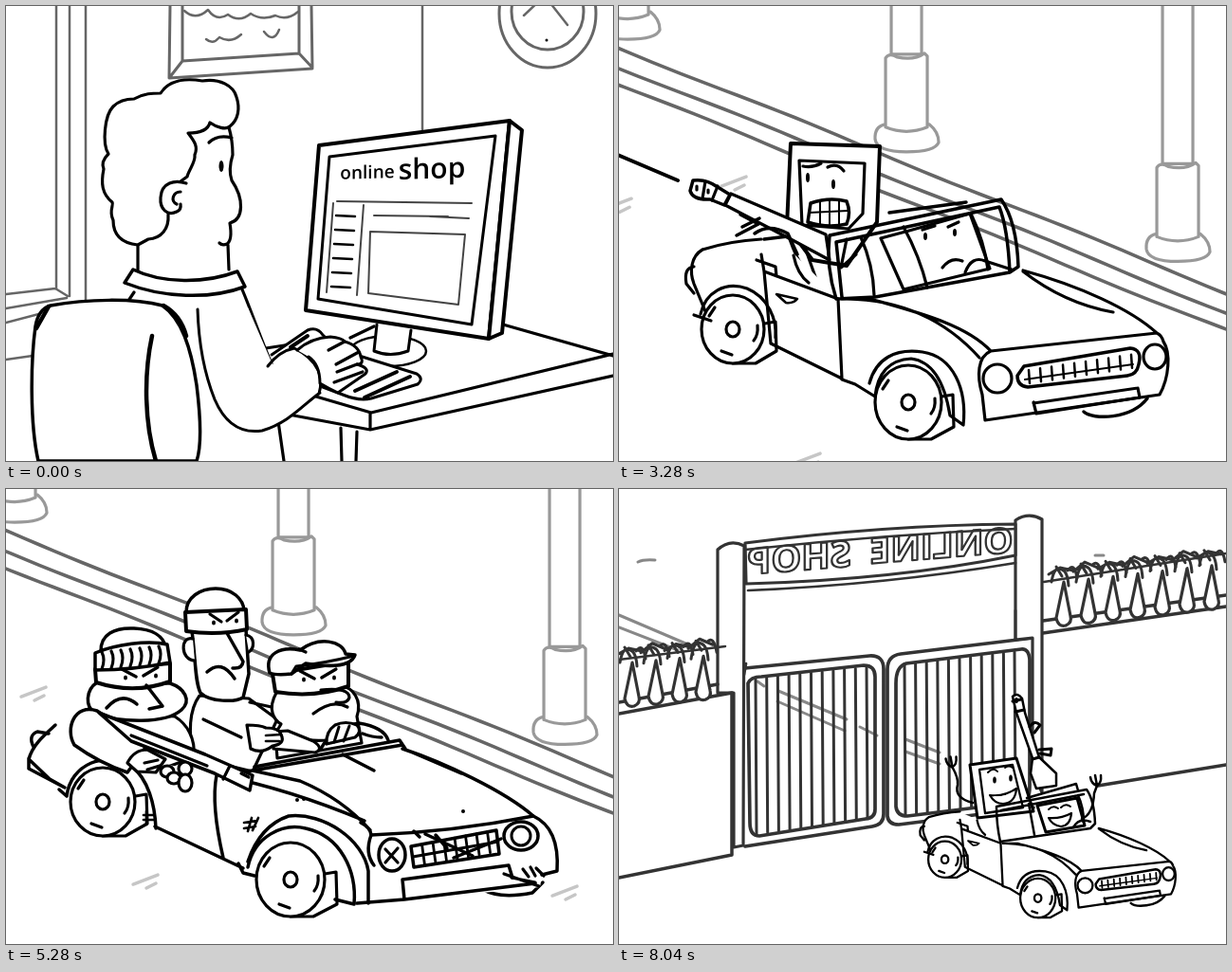
Animation of 640 by 480 pixels, one loop 8120 ms. Source, as an HTML page with a canvas:

```html
<!DOCTYPE html>
<html lang="en">
<head>
<meta charset="utf-8">
<title>Online shop chase</title>
<style>
html,body{margin:0;width:100%;height:100%;overflow:hidden;background:#fff}
canvas{display:block;width:100vw;height:100vh}
</style>
</head>
<body>
<canvas id="stage" width="640" height="480"></canvas>
<script>
const g = document.getElementById('stage').getContext('2d');
const LOOP = 8120, STEP = 40, SLOPE = .404;
const BLACK = '#000', DARK = '#333', GREY = '#666', PALE = '#999', FAINT = '#c6c6c6';
let weight = 1;

function ink(d, width = 3.2, color = BLACK, fill) {
  const p = new Path2D(d);
  if (fill) { g.fillStyle = fill; g.fill(p); }
  if (!width) return;
  g.lineWidth = width * weight; g.strokeStyle = color; g.stroke(p);
}
const solid = (d, width = 3.2, color = BLACK) => ink(d, width, color, '#fff');

function oval(x, y, rx, ry, width = 3.2, color = BLACK, fill = '#fff') {
  g.beginPath(); g.ellipse(x, y, rx, ry, 0, 0, 7);
  g.fillStyle = fill; g.fill();
  if (width) { g.lineWidth = width * weight; g.strokeStyle = color; g.stroke(); }
}
const dot = (x, y, rx = 2, ry = 4) => oval(x, y, rx, ry, 0, BLACK, BLACK);

function place(x, y, draw, s = 1) {
  g.save(); g.translate(x, y); g.scale(s, s); draw(); g.restore();
}
function label(text, x, y, size, matrix, color, bold = 600, outline) {
  g.save();
  g.transform(...matrix, x, y);
  g.font = `${bold} ${size}px "Open Sans", sans-serif`;
  g.textAlign = 'center'; g.textBaseline = 'middle';
  if (outline) { g.lineWidth = 2.3; g.strokeStyle = color; g.strokeText(text, 0, 0); }
  else { g.fillStyle = color; g.fillText(text, 0, 0); }
  g.restore();
}
const clamp = v => Math.max(0, Math.min(1, v));
const ease = v => (1 - Math.cos(Math.PI * clamp(v))) / 2;
const span = (t, a, b) => clamp((t - a) / (b - a));

// ---------- desk ----------
function room() {
  ink('M53 0V298M67 0V306M84 0V311M0 304L52 298L65 306M0 319L64 308M0 334L84 312M0 373L28 369', 2.5, GREY);
  ink('M439 0V130', 2.5, GREY);
  ink('M173 0L172 76L186 58V0M186 58L309 50V0M309 50L323 65L322 0M172 76L323 66', 3, GREY);
  ink('M188 5Q200 16 213 4Q222 17 234 9Q246 18 258 8Q270 16 284 10Q296 16 308 6M211 35Q218 41 224 34M225 33Q237 40 248 30M272 27Q282 40 288 25', 2.5, GREY);
  oval(571, 8, 51, 57, 3, GREY); oval(571, 6, 38, 40, 3, GREY);
  ink('M546 10L565 -8M574 -3L592 20', 2.5, GREY);
  dot(570, 36, 1.5, 1.5);
}
function desk() {
  ink('M274 361L300 357M363 350L388 338M524 336L640 369M303 405L385 429L640 367M298 431L384 447L640 390M384 429V447M353 445L354 480M370 449L369 480');
}
function monitor() {
  oval(403, 364, 40, 16, 2.5);
  solid('M391 336L388 364Q405 371 424 364L427 342', 3);
  solid('M330 147L531 121L509 351L316 321Z', 4);
  solid('M531 121L544 131L523 345L509 351Z', 4);
  solid('M341 159L516 137L491 336L329 309Z', 3);
  label('online', 381, 177, 19, [1, -.03, 0, 1], BLACK);
  label('shop', 449, 174, 30, [1, -.03, 0, 1], BLACK);
  ink('M349 206L491 208M345 208L338 302M377 210L370 305M388 221L466 222M447 222L488 224M384 238L484 241L477 315L382 303Z', 2, '#444');
  for (let i = 0; i < 6; i++) ink(`M${348 - i} ${221 + i * 15}l20 1`, 2.5);
}
function keyboard() {
  solid('M280 368L318 342Q328 338 334 347L350 362L433 388Q441 393 434 399L385 414Q372 417 355 410L334 402', 3);
  ink('M368 406L412 386M378 413L426 391M300 360L318 348', 4);
}
function man() {
  solid('M131 303L120 340L205 480H293L287 440L281 380C270 350 262 322 249 299Z', 0);
  ink('M135 302L127 314M249 299C260 325 268 350 281 380M287 438L293 480');
  solid('M139 252V281Q185 298 235 279L234 252Q238 240 236 229C249 229 252 208 238 184C235 172 239 150 235 128L190 120L150 160Z', 0);
  ink('M139 252V281M235 128C239 142 239 150 239 157C235 170 236 178 238 184C251 203 251 225 236 229Q239 247 233 251Q228 253 225 250M234 252L235 278M214 144C221 137 230 137 238 139');
  solid('M139 252C120 250 113 240 113 226C108 216 114 210 112 207C101 198 100 187 103 172C100 165 104 160 108 156C101 145 104 115 113 106C120 99 128 98 135 98C145 92 155 92 163 92C172 78 190 76 207 79C225 76 240 84 243 96C247 108 245 120 236 127C232 131 222 128 215 123C213 131 205 134 192 134C198 142 203 148 199 157C200 165 193 172 191 180L180 188L171 220C172 235 164 245 150 246Z');
  solid('M190 187C178 183 164 186 163 202C162 214 170 222 180 217Q185 215 184 209M184 196C176 196 173 206 180 209');
  dot(227, 169, 2.5, 6);
  solid('M134 278C165 293 210 293 244 280L252 296C215 310 165 308 125 292Z', 3.5);
}
function arm() {
  solid('M202 320C203 352 208 385 220 415C232 443 250 451 270 448C298 440 314 420 331 408Q333 390 325 380Q315 366 304 361L281 378L255 318', 0);
  ink('M202 320C203 352 208 385 220 415C232 443 250 451 270 448C298 440 314 420 331 408M276 380Q288 364 304 361Q322 370 329 384Q334 396 330 409', 3);
  solid('M307 363Q322 350 342 349Q354 350 357 354Q372 358 374 370Q378 378 370 378Q384 382 379 388L350 408Q341 404 331 398Q331 378 319 370', 3);
  ink('M357 354L340 363M372 365L348 378M370 378L349 386M346 397L376 386');
}
function chair() {
  solid('M34 480C25 440 26 375 31 338Q34 320 47 316C85 309 135 308 165 316C185 330 195 360 201 400C206 440 206 465 201 480Z', 3.5);
  ink('M154 348C145 390 146 440 158 480M166 316Q184 326 190 348M45 317L32 340', 4.5);
}
function deskScene(t) {
  const tap = t >= 160 && t < 520 ? Math.sin((t - 160) / 360 * Math.PI * 4) : 0;
  const jolt = Math.sin(span(t, 840, 1400) * Math.PI);
  room(); desk();
  place(jolt * 11, -jolt * 4, monitor);
  keyboard();
  place(-jolt * 5, -jolt * 10, () => { man(); place(tap * 4, -Math.abs(tap) * 5, arm); });
  chair();
}

// ---------- road ----------
const SPEED = 46.4, RAMP = 4.39, PAIR = 580;
function travelled(t) {
  const f = (t - 2400) / STEP;
  if (f <= 0) return 0;
  if (f < RAMP) return SPEED * f * f / (2 * RAMP);
  const sway = t > 3280 ? 7.5 * Math.sin(Math.PI * (t - 3280) / 2000) : 0;
  return SPEED * (f - RAMP / 2) - sway;
}
function post() {
  solid('M-16 -460V-90H16V-460', 3.2, PALE);
  solid('M-33 0Q-34 -14 -22 -16H24Q34 -8 34 3Q30 13 0 13Q-31 13 -33 0Z', 3.2, PALE);
  solid('M-22 -13V-86Q-18 -92 -10 -87Q8 -83 19 -91L22 -88V-13Q0 -4 -22 -13', 3.2, PALE);
}
function sign() {
  solid('M311 114V179Q320 191 332 180V120', 3.5, '#222');
  solid('M267 25L288 15L394 50L409 48L454 122L388 161L389 145L261 95Z', 3.5, '#222');
  ink('M267 25L391 70L392 57L440 130L454 122M392 57L409 48', 3.5, '#222');
  label('ONLINE', 334, 74, 27, [1, .36, 0, 1], '#222');
  label('SHOP', 337, 101, 27, [1, .29, 0, 1], '#222');
}
// Ground strokes: x, y and the distance at which they stand there.
const strokes = [[64,160,0],[226,315,0],[482,372,0],[0,380,0],[640,455,0],
  [122,186,919],[200,478,919],[26,140,1886],[488,450,1886],
  [30,215,3239],[148,413,3239],[590,425,3239],[300,330,620],[330,300,2740],[180,400,4040]];
const pebbles = [[474,181,0],[413,31,1886]];

function road(d) {
  const first = Math.floor((d - 348) / PAIR) - 1;
  for (let k = first; k < first + 4; k++)
    for (const gap of [0, 294]) {
      const dx = PAIR * k + gap - d;
      place(348 + dx, 159 + SLOPE * dx, post);
    }
  [44, 65, 83].forEach((y0, i) => {
    let path = '';
    for (let x = -10; x <= 650; x += 15)
      path += (path ? 'L' : 'M') + x + ' ' + (y0 + SLOPE * x + 1.2 * Math.sin((x + d) / 47 + i));
    ink(path, 3.6, GREY);
  });
  const along = ([x, y, at], draw) => place(x + at - d, y + (at - d) * SLOPE, draw);
  for (const s of strokes) along(s, () => ink('M-14 4L12 -6M0 8L10 3', 3.5, FAINT));
  for (const s of pebbles) along(s, () => ink('M-9 0Q0 -2 9 0', 3, '#888'));
  if (d < 700) place(-d, -d * SLOPE, sign);
}

// ---------- shop car ----------
function wheel(x, y, rx, ry) {
  const right = x + rx, low = y + ry;
  solid(`M${x} ${low}h24L${right + 13} ${low - 13}L${right + 12} ${y - 8}L${x} ${y}Z`);
  oval(x, y, rx, ry); oval(x, y, 7, 8);
  ink(`M${x - rx + 8} ${y - 14}l6 -9M${x - 12} ${low - 13}l11 4M${right - 7} ${y - 4}q1 10 -4 16`);
}
function shopCar() {
  ink('M490 428C500 437 540 436 557 414', 3.5);
  solid('M84 258L150 247L185 262L231 308L285 303L415 280C480 290 540 325 557 346L574 352C582 365 580 390 570 410L386 437L363 442L270 405L235 393L150 352L95 330L77 300C70 285 74 268 84 258Z', 0);
  wheel(120, 341, 33, 36); wheel(305, 418, 35, 39);
  ink('M88 257Q116 248 150 246M88 257C76 264 74 280 79 293L91 322M79 275Q68 276 71 293L79 303M150 262L153 280L231 309L235 393L160 356L153 280M145 268L165 275L166 285M184 263Q188 283 200 292');
  ink('M166 304L188 309Q184 314 176 313Z', 2.5);
  ink('M86 325C91 302 112 290 135 298C157 307 167 331 165 350M79 326L97 332');
  ink('M235 394L249 399L270 412Q274 374 308 372Q340 376 349 432L363 442C367 405 353 370 320 365C291 361 271 372 264 398');
  ink('M235 309L265 309C310 322 365 335 392 364L567 345M392 364C378 370 377 390 383 410L386 437L570 410C580 392 582 366 574 354Q572 347 567 345C540 320 485 295 426 279M426 280Q470 314 521 323M240 309C310 310 354 342 380 371');
  oval(399, 393, 15, 15); oval(565, 370, 12, 13);
  ink('M427 380L539 361Q552 362 548 378Q546 389 536 390L431 402Q420 401 420 390Z', 3.5);
  for (let i = 0; i < 10; i++) ink(`M${432 + i * 12} ${384 - i * 1.8}l1 14`, 2.5);
  ink('M428 394L542 378', 2);
  ink('M437 418L440 430L549 413L547 403M437 419L547 403');
}
function windscreen() {
  ink('M222 242L403 204C414 220 420 246 421 275L412 281M222 242Q218 275 229 309M229 249L401 212Q410 235 412 281L270 307L229 309M229 249L235 307M285 218L366 207', 3.5);
  ink('M255 244Q268 273 269 305M300 233Q317 264 325 297M371 219Q385 248 389 278M365 281Q372 263 386 269L414 278');
}
function gunners() {
  solid('M181 145L275 148L272 228L240 274L204 268L177 232Z', 4);
  solid('M190 163L259 166L257 219L242 235L193 231Z');
  ink('M194 169Q204 171 213 166M220 170Q230 165 237 174');
  dot(199, 181, 2, 5); dot(226, 188, 2, 5);
  solid('M202 208Q222 201 240 206Q245 218 240 230Q220 235 199 228Z', 3.5);
  ink('M200 218L241 216M212 206V230M222 205V231M232 205V231', 2);
  solid('M276 245L306 237L370 219L391 277L300 299Z');
  ink('M320 236L333 232M347 233L358 228M341 276Q350 264 362 269');
  dot(323, 243, 2, 4); dot(354, 239, 2, 4);
  ink('M180 246C190 275 200 285 210 291M193 246L211 297M240 246L234 276L250 262');
  solid('M118 198L218 241L222 268L183 247L112 210Z');
  solid('M78 184Q92 182 104 191L117 199L111 210L96 204Q78 205 75 195Z', 3.5);
  ink('M91 185L88 203M104 190L98 205M82 190v4M94 194v3');
  ink('M128 220L147 230L124 242M130 233L148 224M143 240Q158 229 178 240L188 262M153 246L178 243', 3.5);
}

// ---------- robbers ----------
function glare(x, y, w) {
  ink(`M${x} ${y - 5}l${w * .4} 8M${x + w} ${y - 7}l${-w * .4} 9`);
  dot(x + 4, y + 4, 2, 2.5); dot(x + w - 2, y + 2, 2, 2.5);
}
function middleRobber(late) {
  solid('M194 210C183 225 182 250 188 275L250 290L276 235L246 213Z');
  solid('M186 142C190 170 189 195 195 207C205 217 232 217 240 212L246 187L243 140Z', 3.5);
  solid('M187 150C174 146 173 172 189 173');
  solid('M243 146C253 148 252 160 246 164');
  solid('M180 122C180 106 195 97 211 97C229 97 240 108 241 120', 3.5);
  solid('M179 122L243 119L244 140Q213 147 180 142Z', 4);
  glare(205, 129, 30);
  ink('M223 144L240 174Q239 182 229 181M202 185Q217 171 231 192', 3.5);
  ink('M198 235L238 254M247 217L270 222');
}
function driver() {
  solid('M275 207C265 225 273 236 280 240L274 250L276 276L365 260L360 232C366 214 355 202 345 200Z');
  solid('M271 187L274 206Q315 213 351 200V174Z', 4);
  glare(300, 189, 38);
  solid('M268 186C262 165 280 158 300 162C320 147 345 152 348 166L358 167C354 180 330 180 306 176L291 187Q275 189 268 186Z', 3.5);
  ink('M291 187L296 179Q325 176 357 168M299 161l7 3M322 204Q352 201 352 212Q350 219 338 217M314 229Q334 213 350 222M276 250Q300 259 330 257');
  ink('M322 266Q334 244 362 239Q388 243 393 257M366 250Q376 254 386 254', 3.5);
  solid('M328 261Q327 248 337 241Q348 236 360 241Q366 248 358 254Z');
  ink('M336 259L341 243M346 258L352 242', 3);
}
function middleHand(late) {
  if (late) solid('M264 240L279 239L306 250Q318 258 308 262L264 258Z');
  else solid('M252 222Q275 220 297 225Q309 234 298 237L265 239Q255 234 252 222Z', 3.5);
  solid('M236 233Q250 233 256 236Q270 236 272 243Q277 253 263 255Q252 264 240 258Z');
  ink('M256 244L272 243M256 250L270 250', 2.7);
}
function leftRobber() {
  solid('M82 226L70 255L120 300L188 275C190 255 181 240 168 232Z');
  solid('M86 196C74 204 73 222 84 228C110 239 158 240 175 225C186 215 178 202 163 197Z', 3.5);
  solid('M90 164C89 145 105 138 125 139C146 140 156 148 158 158', 3.5);
  solid('M84 182L85 196Q125 209 163 195V176Z', 4);
  glare(112, 187, 38);
  solid('M84 165C105 156 140 151 160 156L163 175Q125 183 84 183Z', 3.5);
  for (let i = 0; i < 7; i++) ink(`M${91 + i * 10} ${164 - i}q4 8 0 18`);
  ink('M138 199L155 221L141 224M96 223Q112 205 128 219', 3.5);
}
function robbers(late) {
  middleRobber();
  driver();
  const drop = late ? 8 : 0;
  place(drop, drop, () => middleHand(late));
  leftRobber();
}
function rifle() {
  solid('M86 226C62 218 52 245 62 262C80 275 100 285 118 291L139 262Z', 3.5);
  solid('M88 228L200 272L250 294L247 310L210 292L122 258Z', 3.5);
  ink('M226 284L219 298M238 292l8 4M122 252L202 284');
  solid('M118 281Q125 267 139 267L158 277L148 291L128 290Z');
  ink('M136 281L150 278M139 288L152 284');
  oval(160, 290, 7, 6); oval(179, 287, 7, 7); oval(167, 297, 7, 6); oval(179, 302, 7, 9);
}
function robberCar(late) {
  ink('M492 414Q510 425 545 418L556 407', 3.5);
  solid('M14 275C20 262 30 250 45 248L70 262L215 295L265 288L408 262C460 280 520 310 548 336C565 340 573 360 571 395L555 400L553 412L370 430L358 430L255 395L145 350L60 310L14 285Z', 0);
  ink('M42 241C30 252 18 262 14 277L36 298L52 307M19 264Q13 252 23 248L35 250M14 276L14 287L50 306', 3.5);
  wheel(92, 322, 34, 36); wheel(290, 404, 36, 39);
  ink('M46 309L54 316C58 282 95 268 122 284C140 298 147 325 148 350M212 294Q206 325 219 381M147 348L240 392M235 387L240 397L252 400', 3.5);
  ink('M245 391C252 358 282 344 306 350C343 358 360 395 357 430L337 425M245 385Q258 347 288 337C325 333 367 362 372 395V429', 3.5);
  ink('M244 290L408 262M252 285L405 257L411 266M408 266C450 280 515 310 546 337Q460 354 375 357Q374 349 364 344M215 294Q290 309 368 342M250 289L300 300Q345 319 374 352M414 268L470 292', 3.5);
  ink('M375 357Q368 376 378 389M546 337Q574 350 571 395L555 399M360 429L410 425L548 408M410 425L408 404L520 389L524 402', 3.5);
  oval(397, 378, 14, 17, 3.5); ink('M390 372L403 386M403 371L390 386');
  oval(533, 358, 18, 15, 3.5); oval(533, 358, 10, 10, 3);
  ink('M417 369L507 352L510 377L420 391Z', 3.5);
  for (let i = 1; i < 8; i++) ink(`M${417 + i * 11.5} ${369 - i * 2.2}l3 22`, 2.8);
  ink('M419 380L509 364', 2.8);
  ink('M515 398L552 411M535 393l6 8M543 391l5 9M549 392l8 8M523 402L548 407');
  ink('M241 344l13 -2M241 350l12 -2M245 353l4 -14M250 352l6 -13M135 336h11M135 341h11M138 332v14', 2.7);
  dot(297, 320, 2, 2); dot(304, 319, 2, 2); dot(472, 332, 2, 2);
  if (late) ink('M432 356L482 379M443 357L455 371M462 381L512 361M345 272L378 289M420 353l6 6', 3.5);
}

function chase(t) {
  road(travelled(t));
  if (t < 3720) {
    const back = (1 - ease(span(t, 2400, 2840))) * 620;
    const bob = 2 * Math.sin((t - 3280) / 120 * 2 * Math.PI);
    place(-back, -back * SLOPE + bob, () => { gunners(); shopCar(); windscreen(); });
    const shot = (t - 2880) % 400;
    if (t >= 2880 && shot < 40) ink('M-4 156L62 184', 4);
    else if (t >= 2880 && shot < 80) ink('M-4 156L20 166', 4);
    return;
  }
  const late = t >= 4700, k = (1 - Math.cos(Math.PI * (t - 4120) / 1160)) / 2;
  place(k * 10, k * 8, () => { robbers(late); robberCar(late); rifle(); });
  if ((t - 3720) % 400 < 40) ink('M533 361Q590 387 642 417', 3.5);
}

// ---------- gate ----------
function spikes(x, y, n, gap, slope) {
  for (let i = 0; i < n; i++) {
    const w = i % 2 * 3;
    place(x + i * gap, y + i * gap * slope, () => {
      solid('M0 0L-8 38Q-6 48 2 46Q9 43 7 36Z', 3.2, DARK);
      ink(`M-13 ${w}Q-10 -18 -2 -13Q4 -11 5 4M-16 -8L-4 -${15 + w}L10 -12M4 -${12 + w}Q11 -22 14 -4M-8 -16L-2 -6`, 3, DARK);
    });
  }
}
function door(hinge, scale, frame, x0, count, gap, top, bottom, slopeTop, slopeBottom) {
  g.save();
  g.translate(hinge, 0); g.scale(scale, 1); g.translate(-hinge, 0);
  ink(frame, 3.7, DARK);
  for (let i = 0; i < count; i++) {
    const x = x0 + i * gap;
    ink(`M${x} ${top + slopeTop * i * gap}L${x + 1} ${bottom + slopeBottom * i * gap}`, 3, DARK);
  }
  g.restore();
}
function gate(scale) {
  ink('M0 133L75 165M0 146L62 170M20 77Q26 74 38 75M502 70H511', 3, '#888');
  ink('M146 203L153 208M168 213L240 243M167 224L238 255M254 251L272 260M302 264L338 278M302 277L338 290', 3, '#888');
  door(133, scale, 'M133 189L264 176Q279 175 279 190V343Q279 354 267 356L133 377M150 198L258 186Q270 186 270 198V338Q270 347 260 348L148 366Q138 366 138 352L136 205Q139 198 150 198Z',
    144, 11, 11.7, 200, 364, -.1, -.14);
  door(437, scale, 'M437 157L297 174Q283 176 283 190V345Q284 354 295 354L437 336M424 169L303 184Q292 187 292 205V335Q293 345 304 345L426 330Q433 328 433 314V180Q432 168 424 169Z',
    301, 11, 11.6, 186, 344, -.12, -.13);
  solid('M104 64Q117 52 132 60L131 376L121 378V215H104Z', 3.2, DARK);
  solid('M418 33Q432 24 446 32V320L436 300V157L418 159Z', 3.2, DARK);
  solid('M133 57Q280 38 418 37V70Q290 96 134 100Z', 3.2, DARK);
  ink('M133 64Q280 48 418 42M136 107Q280 101 418 78M418 128v30M134 184L132 196', 2.7, DARK);
  label('SHOP', 190, 76, 40, [-1, .08, 0, .95], DARK, 700, true);
  label('ONLINE', 340, 63, 39, [-1, .08, 0, .95], DARK, 700, true);
  ink('M0 237L119 215V386L0 410M0 225L104 206', 3.5, DARK);
  ink('M447 152L640 124M447 139L640 112M505 313L640 291', 3.5, DARK);
  spikes(14, 183, 4, 25, -.09);
  spikes(469, 98, 7, 26, -.11);
  ink('M0 180L112 166M448 98L640 68', 2.5, DARK);
}
function hand(x, y) {
  ink(`M${x} ${y}q-6 -2 -7 -9M${x} ${y}l-2 -11M${x} ${y}q5 -3 4 -11`, 2.5);
}
function happyCrew(wave) {
  solid('M415 219Q420 214 425 221L428 236L443 283L461 300L461 313L440 316L434 300L436 284L419 236Z', 2.5);
  ink('M415 224L424 222M418 235L427 233M433 251Q438 243 444 249L438 257M443 275L456 274L455 281L444 279M436 285L443 283', 3);
  dot(419, 223, 2, 3);
  const lx = 351 + wave, ly = 295 - 3 * wave, rx = 505 - 2 * wave, ry = 317 - 8 * wave;
  ink(`M373 331Q353 326 357 312Q358 305 ${lx} ${ly}`, 2.5); hand(lx, ly);
  solid('M370 291L419 284L437 340L378 347Z', 3);
  solid('M380 296L415 291L426 336L386 342Z', 2.3);
  ink('M389 299Q395 293 399 298M407 294Q411 291 415 294', 2);
  dot(396, 307, 1.8, 3.5); dot(413, 305, 1.8, 3.5);
  const mouth = wave > .5 ? '#fff' : BLACK;
  ink('M391 323Q406 325 419 316Q418 331 405 332Q396 332 391 323Z', 2.2, BLACK, mouth);
  ink('M396 325Q407 326 416 320', 2, '#fff');
  solid('M441 334L483 326L491 355L450 362Z', 3);
  ink('M453 338Q458 333 463 337M466 336Q471 331 476 335', 2);
  ink('M453 347Q466 348 477 342Q476 355 466 356Q457 355 453 347Z', 2.2, BLACK, mouth);
  ink(`M488 348Q500 343 ${rx - 3} ${ry + 8}L${rx} ${ry}`, 2.5); hand(rx, ry);
}
function gateScene(t) {
  gate(1 - .82 * (1 - ease(span(t, 6120, 6560))));
  const run = span(t, 5720, 6280);
  const off = -165 * (1 - ease(run)) + 8 * Math.sin(Math.PI * span(t, 6120, 6560));
  const waving = t >= 6600 && t < 8080;
  const wave = waving ? (1 - Math.cos((t - 6720) / 240 * Math.PI)) / 2 : 1;
  g.save();
  g.beginPath(); g.rect(134, 100, 506, 380); g.clip();
  place(off, off * .42, () => {
    happyCrew(wave);
    weight = 1.35;
    place(280, 210, shopCar, .53);
    weight = 1;
    ink('M398 335L493 317Q501 328 502 353L497 358L402 372Q398 354 398 335ZM403 339L490 322M432 332L438 365M484 323Q490 336 490 352M430 326L482 311L484 318M479 357Q485 346 497 351', 2.5);
  });
  g.restore();
}

function draw(t) {
  g.fillStyle = '#fff'; g.fillRect(0, 0, 640, 480);
  g.lineCap = g.lineJoin = 'round';
  if (t < 1680) deskScene(t);
  else if (t < 5760) chase(t);
  else gateScene(t);
}
const start = performance.now();
function tick() {
  const t = (performance.now() - start) % LOOP;
  draw(Math.floor(t / STEP) * STEP);
  requestAnimationFrame(tick);
}
tick();
</script>
</body>
</html>
```
